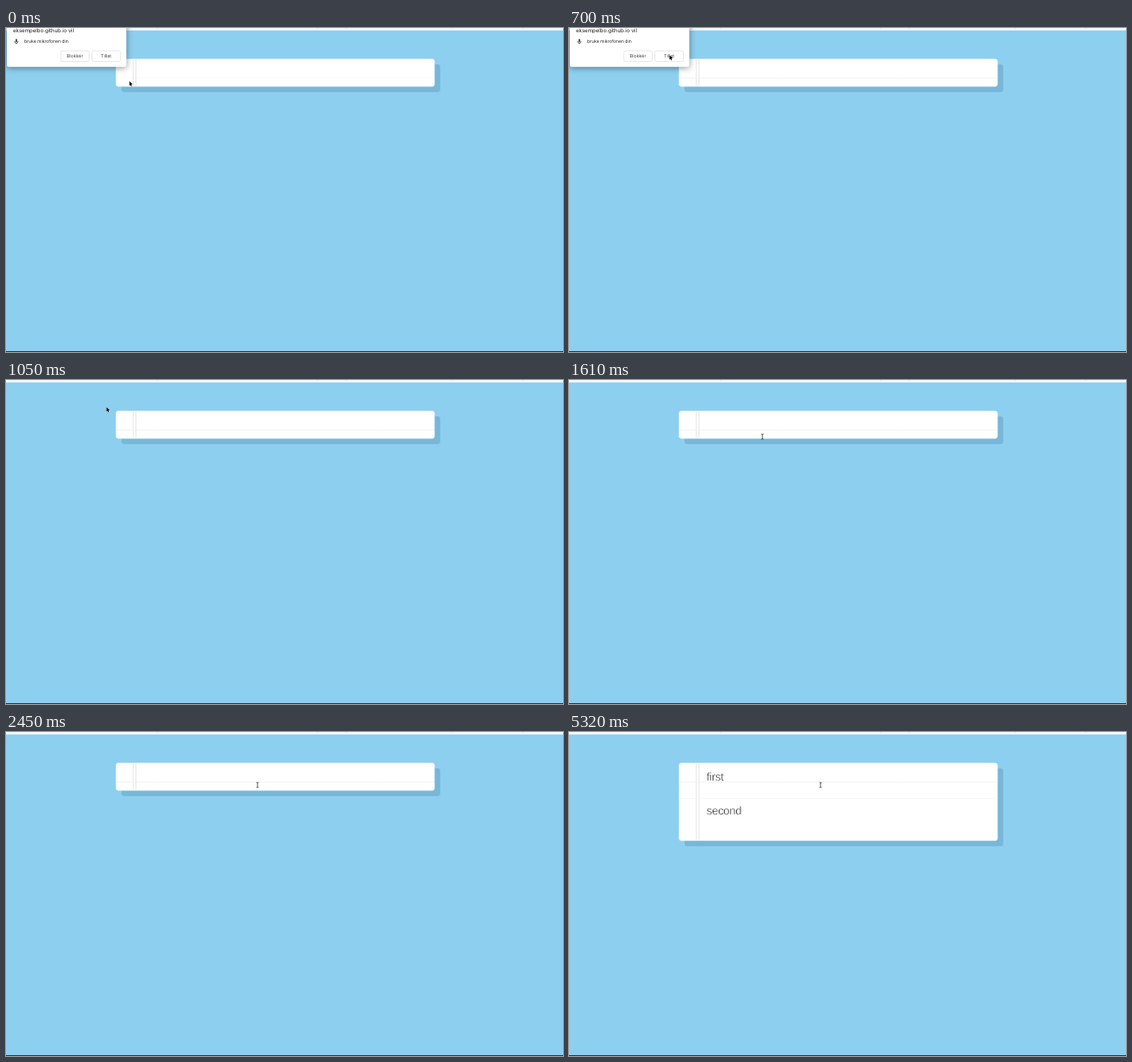
Write an HTML page that moves like this. It is 640x373 px and loops after 8000 ms.

```html
<!DOCTYPE html>
<html lang="no">
<head>
<meta charset="utf-8">
<title>Voice notes</title>
<style>
  html, body { margin: 0; height: 100%; overflow: hidden; background: #8dcfef; }
  svg { display: block; width: 100vw; height: 100vh; text-rendering: geometricPrecision; }
  .soft { filter: blur(.4px); }
  /* The white outline thins the letters to a light weight */
  .note { font: 13px "Liberation Sans", Arial, sans-serif; letter-spacing: -.3px; fill: #333; stroke: #fff; stroke-width: .3; }
  .ui { font-family: Inter, sans-serif; fill: #1c1c1c; }
  .button rect { fill: #fff; stroke: #dcdee1; stroke-width: .7; }
  .button text { font-size: 5.3px; fill: #444; text-anchor: middle; }
  #popup > rect { fill: #fff; filter: drop-shadow(0 1px 3.5px rgba(0, 0, 0, .45)); }
</style>
</head>
<body>
<svg viewBox="0 0 640 373">
  <rect width="640" height="373" fill="#8dcfef"/>
  <rect class="soft" x="-5" y="-5" width="650" height="7.8" fill="#f5f8f8"/>
  <path d="M173 .3h2M357 .3h2M390 .3h2M512 .3h2M593 .3h2" stroke="#d3d8d8" stroke-width=".6"/>
  <rect y="372" width="640" height="1" fill="#0b4d1c"/>

  <rect id="shadow" class="soft" x="132.8" y="41.8" width="366" rx="3" fill="#77b7d8"/>
  <rect id="card" class="soft" x="126.3" y="35.6" width="366.2" rx="3" fill="#fff"/>
  <path id="margin" stroke="#dedede" stroke-width=".8"/>
  <path id="rule1" d="M127 57.5H492" stroke="#ececec" stroke-width=".8" stroke-dasharray="2 .6"/>
  <path id="rule2" d="M127 76.5H492" stroke="#f3f3f3" stroke-width=".8" stroke-dasharray="2 .6"/>
  <text id="first" class="note" x="158" y="56.4">first</text>
  <text id="second" class="note" x="158" y="94.8">second</text>

  <g id="popup" class="ui">
    <rect x="1" y="-10" width="137.3" height="54.8" rx="2"/>
    <text x="8" y="5.2" font-size="6.1">eksempelbo.github.io vil</text>
    <g fill="none" stroke="#444" stroke-width=".8">
      <path d="M9.9 15v.4a2 2 0 0 0 4 0V15M11.9 17.4v1.3"/>
      <path d="M11.9 13.4v2" stroke-width="1.8" stroke-linecap="round"/>
    </g>
    <text x="21" y="17.2" font-size="5.05">bruke mikrofonen din</text>
    <g class="button"><rect x="63" y="26.2" width="32.6" height="12.4" rx="1.8"/><text x="79.1" y="34.2">Blokkér</text></g>
    <g class="button"><rect x="98.8" y="26.2" width="32.6" height="12.4" rx="1.8"/><text x="115.1" y="34.2">Tillat</text></g>
  </g>

  <path id="arrow" d="M0 0V5.2L1.2 4.1 2 6 2.9 5.6 2.1 3.8H3.7Z" fill="#000" stroke="#fff" stroke-width=".6" paint-order="stroke"/>
  <path id="beam" d="M-1.4-3Q0-3 0-2.2Q0-3 1.4-3M0-2.2V2.2M-1.4 3Q0 3 0 2.2Q0 3 1.4 3" fill="none" stroke="#333" stroke-width=".8"/>
</svg>
<script>
const LOOP = 8000, STEP = 70;
const $ = id => document.getElementById(id);
const show = (id, on) => $(id).setAttribute("visibility", on ? "visible" : "hidden");
const progress = (t, from, to) => Math.min(1, Math.max(0, (t - from) / (to - from)));
const ease = p => p * p * (3 - 2 * p);

// Pointer moves: start, end, destination
const moves = [
  [0, 350, 115.5, 31.3],
  [1260, 1610, 222.2, 65.2],
  [2170, 2450, 289, 61],
];

function pointerAt(t) {
  let x = 141.8, y = 61.3;
  for (const [from, to, endX, endY] of moves) {
    const p = ease(progress(t, from, to));
    x += (endX - x) * p;
    y += (endY - y) * p;
  }
  return [x, y];
}

function draw(time) {
  const t = Math.floor(time / STEP) * STEP;
  const bottom = t >= 5320 ? 125.2 : t >= 3430 ? 86.6 : 67.6;
  $("card").setAttribute("height", bottom - 35.6);
  $("shadow").setAttribute("height", bottom - 35.6);
  $("margin").setAttribute("d", `M146.2 36V${bottom - 1}M149.2 36V${bottom - 1}`);
  $("rule1").setAttribute("opacity", t < 70 ? .3 : 1);
  show("rule2", t >= 3430);
  show("first", t >= 3430);
  show("second", t >= 5320);
  $("popup").setAttribute("opacity", 1 - progress(t, 770, 1050));

  const [x, y] = pointerAt(t);
  const overInput = t > 1260 && x > 149 && y > 36;
  show("arrow", !overInput);
  show("beam", overInput);
  $(overInput ? "beam" : "arrow").setAttribute("transform", `translate(${x} ${y})`);
}

const start = performance.now();
function frame() {
  draw((performance.now() - start) % LOOP);
  requestAnimationFrame(frame);
}
frame();
</script>
</body>
</html>
```
